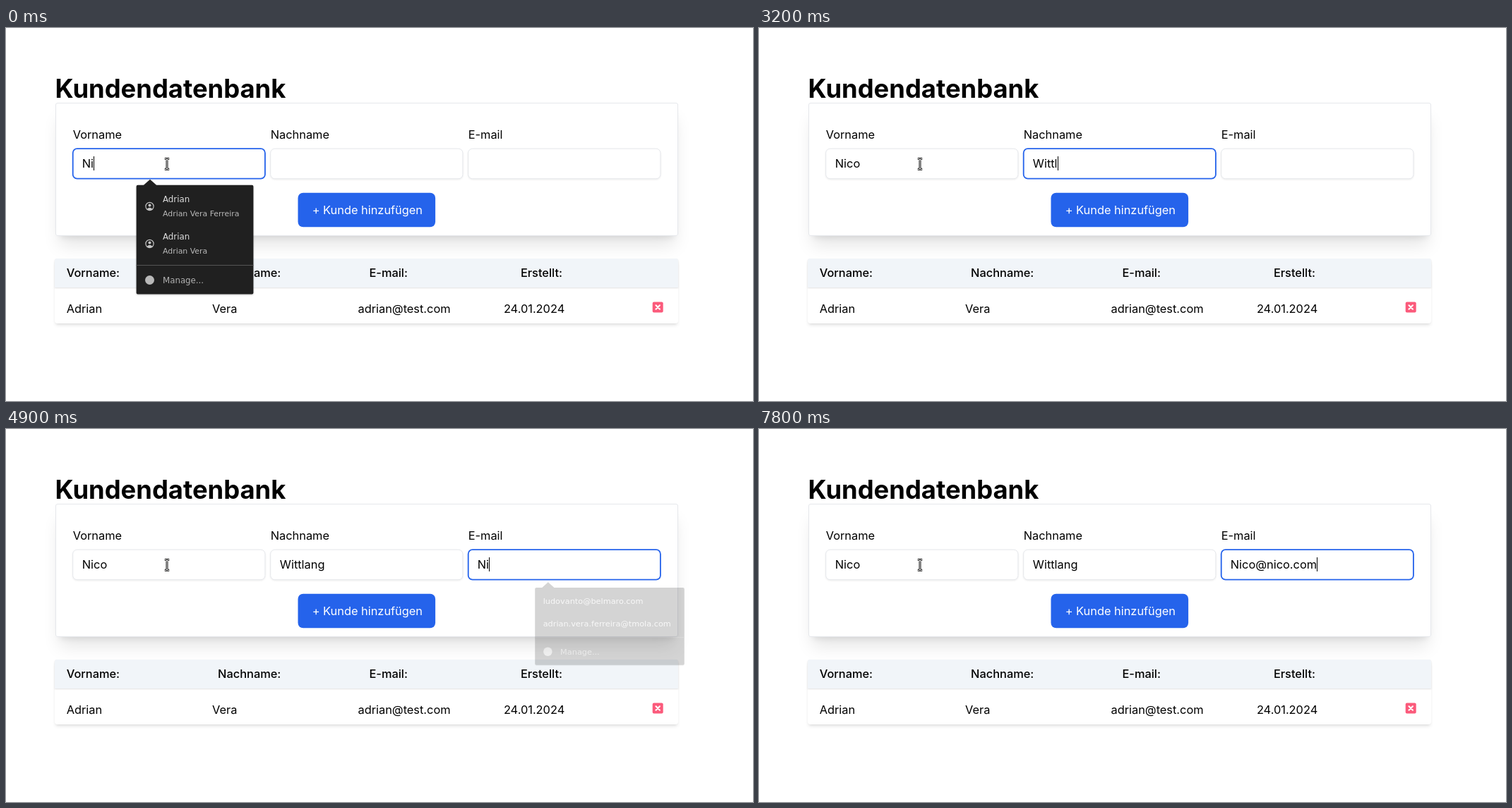
These frames come from a looping animation (1058x529 px, 8000 ms). An HTML page:

```html
<!DOCTYPE html>
<html lang="de">
<head>
<meta charset="utf-8">
<title>Kundendatenbank</title>
<style>
html, body { margin: 0; width: 100%; height: 100%; overflow: hidden; background: #fff; }
body { position: relative; }
div { position: absolute; box-sizing: border-box; }
svg { position: absolute; left: 0; top: 0; }
text { font: 16.36px Inter, sans-serif; white-space: pre; }
.title { font-size: 36.36px; font-weight: 700; }
.medium { font-weight: 500; }
.menu { filter: drop-shadow(0 1px .8px rgba(0,0,0,.22)); }
.menu text { font: 11.8px "DejaVu Sans", sans-serif; fill: #dedede; }
.menu .sub { font-size: 10.9px; fill: #bababa; }
.menu .more { fill: #b0b0b0; }
.field { fill: #fff; stroke: #e5e7eb; stroke-width: 1; filter: drop-shadow(0 1px .9px rgba(0,0,0,.08)); }
.field.on { stroke: #2563eb; stroke-width: 1.82; filter: none; }
.card { left: 70px; top: 106px; width: 882px; height: 189px; border: 1px solid #e5e7eb; border-radius: 3px;
  box-shadow: 0 18px 23px -4.5px rgba(0,0,0,.1), 0 7px 9px -5.5px rgba(0,0,0,.1); }
.table { left: 69px; top: 327px; width: 883px; height: 92px; border-radius: 4px; background: #fff;
  box-shadow: 0 3.6px 5.4px -1px rgba(0,0,0,.1), 0 2px 3.6px -2px rgba(0,0,0,.1); }
.head { left: 69px; top: 327px; width: 883px; height: 41px; border-radius: 3px 3px 0 0; background: #f1f5f9;
  box-shadow: 0 1px 2px rgba(0,0,0,.12); }
</style>
</head>
<body>
<div class="card"></div>
<div class="table"></div>
<div class="head"></div>
<svg width="1058" height="529" viewBox="0 0 1058 529"></svg>
<script>
const NS = "http://www.w3.org/2000/svg";
const svg = document.querySelector("svg");
const LOOP = 8000;

function add(parent, tag, attrs, content) {
  const el = document.createElementNS(NS, tag);
  for (const key in attrs) el.setAttribute(key, attrs[key]);
  if (content) el.textContent = content;
  parent.appendChild(el);
  return el;
}
const label = (x, y, s, cls = "", parent = svg) => add(parent, "text", { x, y, class: cls }, s);
const show = (el, on) => el.setAttribute("visibility", on ? "visible" : "hidden");

label(69.5, 99, "Kundendatenbank", "title");
add(svg, "rect", { x: 413.5, y: 233.7, width: 194.6, height: 48.6, rx: 7.3, fill: "#2563eb" });
label(433.7, 264, "+ Kunde hinzufügen").setAttribute("fill", "#fff");
["Vorname:", "Nachname:", "E-mail:", "Erstellt:"].forEach((s, i) => label(85.7 + 214.4 * i, 353, s, "medium"));
["Adrian", "Vera", "adrian@test.com", "24.01.2024"].forEach((s, i) => label(85.7 + 206.4 * i, 403.5, s));

add(svg, "rect", { x: 915.7, y: 388.5, width: 15, height: 15, rx: 2, fill: "#fb5a7b" });
add(svg, "path", { d: "M920.5 393.3l5.4 5.4m0-5.4l-5.4 5.4", stroke: "#fff", "stroke-width": 2.2, "stroke-linecap": "round" });

const fields = ["Vorname", "Nachname", "E-mail"].map((name, i) => {
  const x = 94.7 + 280 * i;
  label(x, 157, name);
  return {
    box: add(svg, "rect", { x, y: 171.2, width: 272.2, height: 42.5, rx: 6 }),
    x: x + 13.1,
    text: label(x + 13.1, 198, "")
  };
});
const mark = add(svg, "rect", { x: 108, y: 180.5, height: 24, fill: "#3367d1" });
svg.insertBefore(mark, fields[0].text);
const caret = add(svg, "rect", { y: 182, width: 1, height: 20 });

const beam = "M224.8 185.5h2.2l1 .8 1-.8h2.2M224.8 200.3h2.2l1-.8 1 .8h2.2M228 186v14";
add(svg, "path", { d: beam, fill: "none", stroke: "#000", "stroke-width": 2.9 });
add(svg, "path", { d: beam, fill: "none", stroke: "#fff", "stroke-width": 1 });

function menu(x, width, height, line, moreX) {
  const g = add(svg, "g", { class: "menu" });
  add(g, "path", { d: `M${x} 224.7q0-2 2-2h8.4l9-8 9 8h${width - 30.4}q2 0 2 2v${height - 4}q0 2-2 2h${4 - width}q-2 0-2-2z`, fill: "#202020" });
  add(g, "path", { d: `M${x} ${line}h${width}`, stroke: "#555" });
  add(g, "circle", { cx: x + 18.9, cy: line + 21, r: 6.5, fill: "#b8b8b8" });
  label(moreX, line + 25.5, "Manage...", "more", g);
  return { g, cx: x + width / 2, cy: 219 + height / 2 };
}

const nameMenu = menu(184.6, 165.8, 154.8, 336.5, 222);
["Adrian Vera Ferreira", "Adrian Vera"].forEach((full, i) => {
  const y = 253 + 53 * i, g = nameMenu.g;
  label(222, y - 6.5, "Adrian", "", g);
  label(222, y + 14, full, "sub", g);
  add(g, "circle", { cx: 203.5, cy: y, r: 5.6, fill: "none", stroke: "#c4c4c4", "stroke-width": 1.2 });
  add(g, "circle", { cx: 203.5, cy: y - 1.5, r: 2, fill: "#c4c4c4" });
  add(g, "path", { d: `M199.5 ${y + 4}q4-4.6 8 0q-4 3-8 0`, fill: "#c4c4c4" });
});

const mailMenu = menu(744.6, 220.8, 114.6, 296.5, 782);
["ludovanto@belmaro.com", "adrian.vera.ferreira@tmola.com"].forEach((s, i) => label(756.5, 247.2 + 33 * i, s, "", mailMenu.g));

function setMenu({ g, cx, cy }, alpha) {
  const k = 1 - .052 * (1 - alpha);
  show(g, alpha > 0);
  g.setAttribute("opacity", alpha);
  g.setAttribute("transform", `translate(${cx} ${cy}) scale(${k}) translate(${-cx} ${-cy})`);
}

// Each list holds [start time, value]; a value stays until the next start.
const at = (steps, t) => steps.reduce((v, [start, value]) => t >= start ? value : v, steps[0][1]);
const typing = (word, keys) => keys.map(([t, n]) => [t, word.slice(0, n)]);

const typed = [
  typing("Nico", [[0, 2], [300, 4]]),
  typing("Wittlang", [[0, 0], [2700, 1], [2800, 2], [3000, 3], [3200, 5], [3400, 6], [3500, 7], [4000, 8]]),
  [...typing("Nico/", [[0, 0], [4600, 1], [4700, 2], [5000, 4], [5600, 5]]),
   ...typing("Nico@nico.com", [[6200, 4], [6700, 5], [7000, 7], [7200, 8], [7300, 9], [7400, 10], [7600, 11], [7700, 12], [7800, 13]])]
];
const focus = [[0, 0], [600, -1], [1400, 0], [2000, 1], [4200, 2]];
const nameAlpha = [[0, 1], [100, .19], [300, 0]];
const mailAlpha = [[0, 0], [4600, 1], [4800, .9], [4900, .19], [5000, 0]];

function draw(t) {
  const active = at(focus, t);
  const selected = t >= 1400 && t < 2000;
  fields.forEach((f, i) => {
    f.box.setAttribute("class", i === active ? "field on" : "field");
    f.text.textContent = at(typed[i], t);
  });
  fields[0].text.setAttribute("fill", selected ? "#fff" : "#000");
  mark.setAttribute("width", fields[0].text.getComputedTextLength());
  show(mark, selected);
  show(caret, active >= 0 && !selected && !(t >= 6200 && t < 6300));
  if (active >= 0) {
    const f = fields[active];
    caret.setAttribute("x", Math.round(f.x + f.text.getComputedTextLength()));
  }
  setMenu(nameMenu, at(nameAlpha, t));
  setMenu(mailMenu, at(mailAlpha, t));
}

const begin = performance.now();
function tick() {
  draw((performance.now() - begin) % LOOP);
  requestAnimationFrame(tick);
}
draw(0);
requestAnimationFrame(tick);
</script>
</body>
</html>
```
